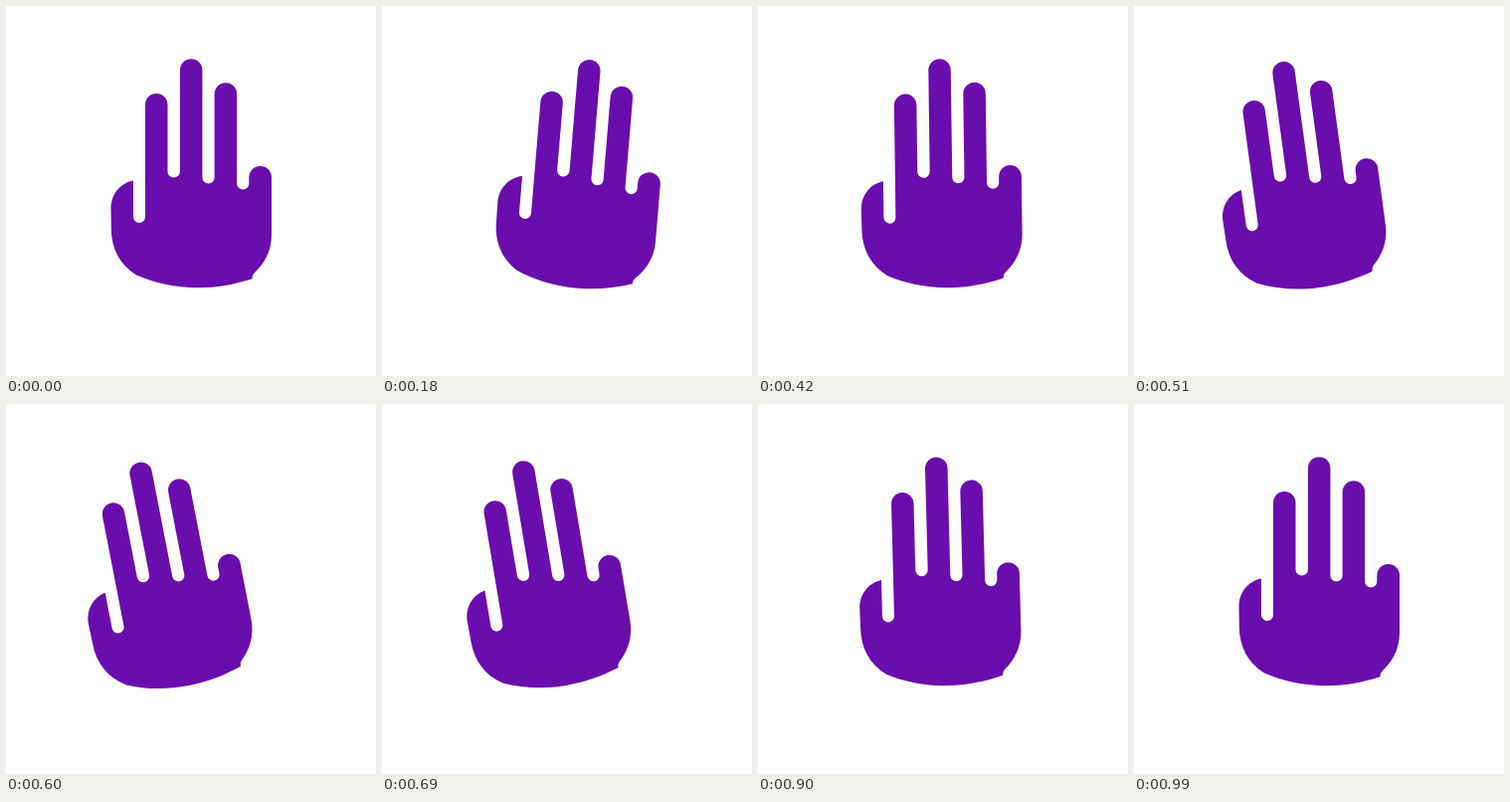
These frames come from a looping animation (372 px wide and 372 px high, 1110 ms). An HTML page:

```html
<!DOCTYPE html>
<html lang="en">
<head>
<meta charset="utf-8">
<title>Waving hand</title>
<style>
  html, body { margin: 0; width: 100%; height: 100%; overflow: hidden; background: #fff; }
  svg { display: block; width: 100%; height: 100%; }
</style>
</head>
<body>
<svg viewBox="0 0 372 372">
  <path id="hand" fill="#6a0dad" d="
    M128 175.5 V212 a6 6 0 0 0 12 0
    V99.3 a11.25 11.25 0 0 1 22.5 0 V166.4 a6.2 6.2 0 0 0 12.4 0
    V64.5 a11.25 11.25 0 0 1 22.5 0 V172.4 a6.1 6.1 0 0 0 12.2 0
    V88.4 a11.25 11.25 0 0 1 22.5 0 V178.4 a6.1 6.1 0 0 0 12.2 0
    V172.3 a11.35 11.35 0 0 1 22.7 0
    V230 C267 247 259 260 249.5 268.5 Q247.3 270.5 247.5 274.2
    C230 280 211 283.2 193 283.2 C170 283.2 149 278.5 131 270.5
    C114 260 105.8 243 105.8 224 L105.5 204
    C105.5 189 115 178 128 175.5 Z"/>
</svg>
<script>
  const LOOP = 1110, STEP = 30;
  const PIVOT = "187.8 329.5";
  // [time in ms, angle in degrees]
  const KEYS = [[30, 0], [270, 7], [600, -11], [990, 0]];
  const hand = document.getElementById("hand");

  const ease = p => p * p * (3 - 2 * p);

  function angleAt(t) {
    for (let i = 1; i < KEYS.length; i++) {
      const [t0, a0] = KEYS[i - 1], [t1, a1] = KEYS[i];
      if (t >= t0 && t < t1) return a0 + (a1 - a0) * ease((t - t0) / (t1 - t0));
    }
    return 0;
  }

  function draw(ms) {
    const t = Math.floor((ms % LOOP) / STEP) * STEP;
    hand.setAttribute("transform", `rotate(${angleAt(t).toFixed(3)} ${PIVOT})`);
  }

  const start = performance.now();
  function tick() {
    draw(performance.now() - start);
    requestAnimationFrame(tick);
  }
  tick();
</script>
</body>
</html>
```
